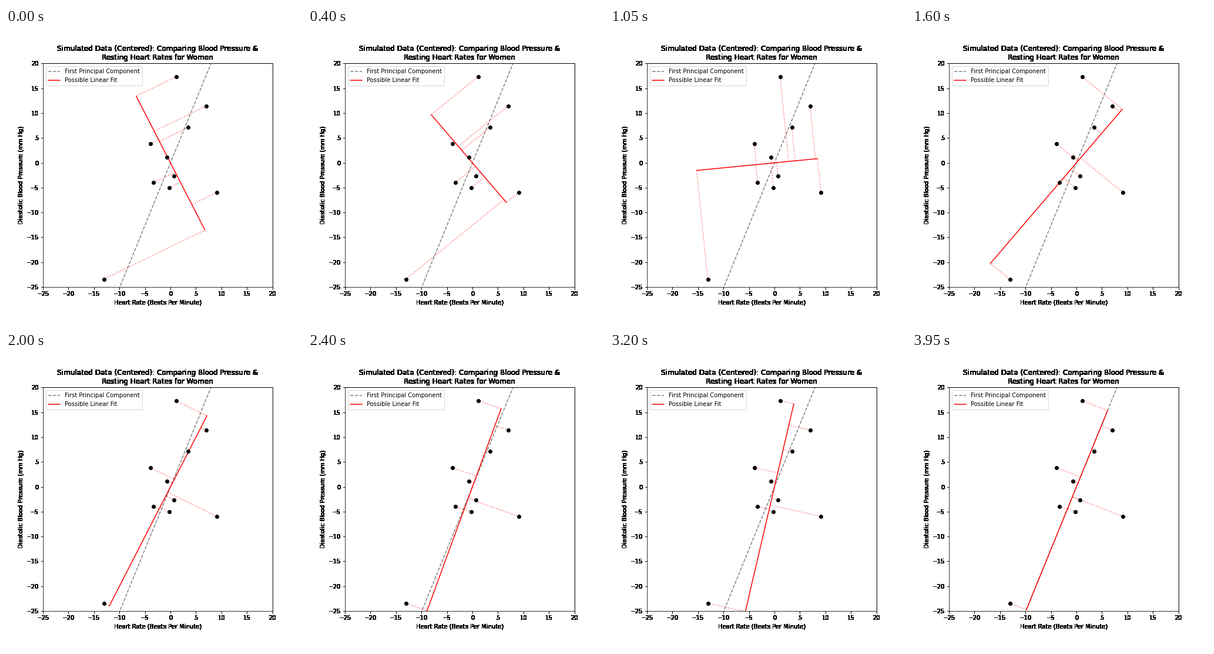
These frames come from a looping animation (504 px wide and 504 px high, 4.5 s). A matplotlib script:

```python
import numpy as np
import matplotlib.pyplot as plt
from matplotlib.animation import FuncAnimation

STEP_MS = 50
FRAMES = 90
SWEEP = 79          # frames of turning before the fit settles

HEART = np.array([1.10, 6.98, 3.41, -3.97, -0.68, -3.33, 0.70, -0.22, 9.11, -13.07])
PRESSURE = np.array([17.35, 11.44, 7.12, 3.87, 1.15, -3.96, -2.63, -4.98, -5.94, -23.44])


def principal_slope(x, y):
    """Slope of the first principal component of centered data."""
    _, vectors = np.linalg.eigh(np.cov(x, y))
    dx, dy = vectors[:, -1]
    return dy / dx


def project(slope):
    """Orthogonal projection of every point on a line through the center."""
    px = (HEART + slope * PRESSURE) / (1 + slope ** 2)
    return px, slope * px


def solid(image, dpi):
    """Turn every touched pixel fully black, without soft edges."""
    out = np.zeros_like(image)
    out[..., 3] = image[..., 3] > 0
    return out, 0, 0


plt.rcParams["font.family"] = "DejaVu Sans"
fig, ax = plt.subplots(figsize=(7, 7), dpi=72, facecolor="white")
fig.subplots_adjust(left=0.125, right=0.9, bottom=0.125, top=0.88)

PC_SLOPE = principal_slope(HEART, PRESSURE)
ends = np.array([-20, 20])
ax.plot(ends, PC_SLOPE * ends, "--", color="gray", label="First Principal Component")
fit, = ax.plot([], [], color="red", label="Possible Linear Fit")
errors = [ax.plot([], [], ":", color="red", alpha=0.6)[0] for _ in HEART]
ax.plot(HEART, PRESSURE, "o", color="black", zorder=3)

ax.set(xlim=(-25, 20), ylim=(-25, 20),
       xticks=range(-25, 21, 5), yticks=range(-25, 21, 5),
       xlabel="Heart Rate (Beats Per Minute)",
       ylabel="Diastolic Blood Pressure (mm Hg)",
       title="Simulated Data (Centered): Comparing Blood Pressure &\n"
             "Resting Heart Rates for Women")
ax.legend(loc="upper left")

for part in (ax.title, ax.xaxis, ax.yaxis, ax.spines["top"], ax.spines["right"]):
    part.set_agg_filter(solid)


def update(frame):
    slope = -2 + 0.1 * frame if frame < SWEEP else PC_SLOPE
    px, py = project(slope)
    span = np.array([px.min(), px.max()])
    fit.set_data(span, slope * span)
    for line, x, y, qx, qy in zip(errors, HEART, PRESSURE, px, py):
        line.set_data([x, qx], [y, qy])
    return [fit, *errors]


anim = FuncAnimation(fig, update, frames=FRAMES, interval=STEP_MS,
                     repeat=True, repeat_delay=0, blit=False)
plt.show()
```
